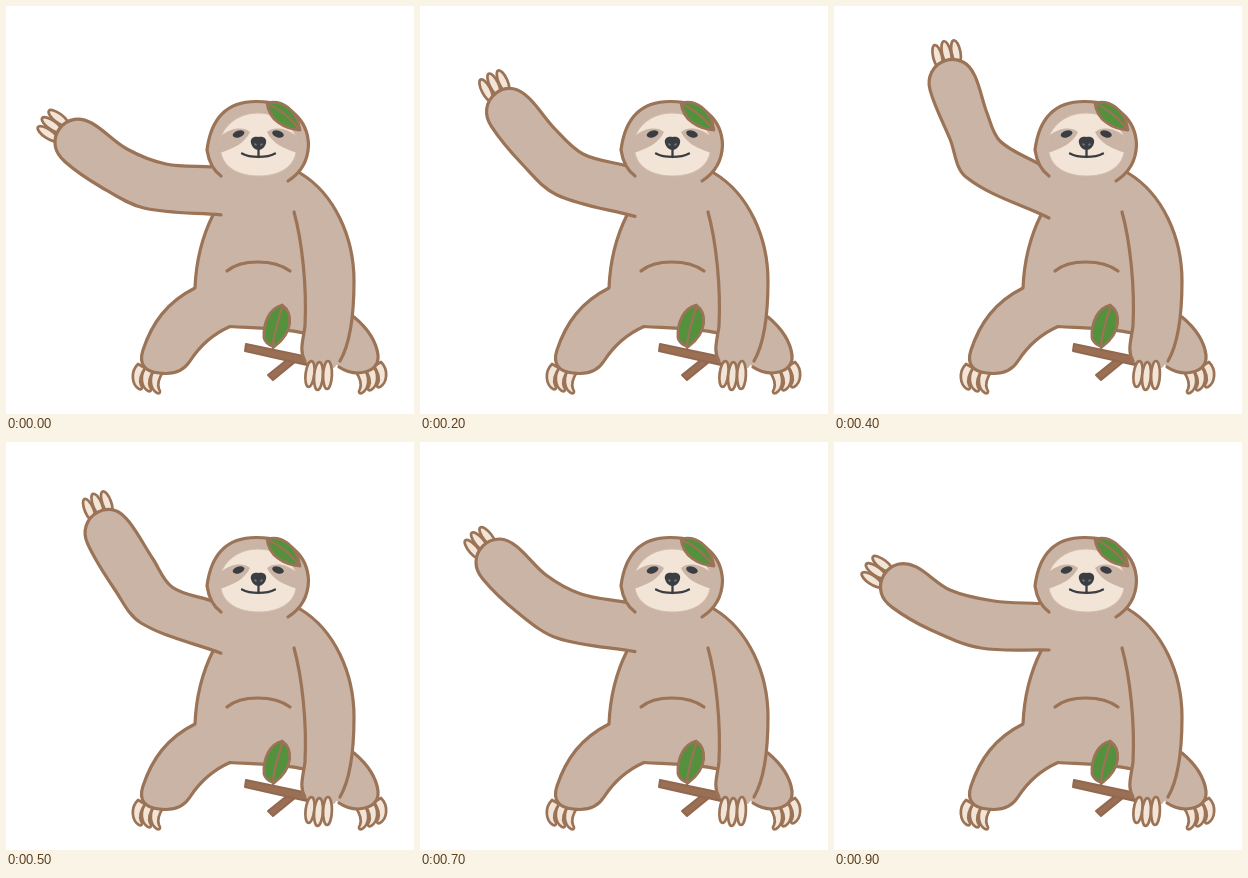
An HTML page with a canvas that plays this animation: 408 px wide and 408 px high, repeating every 1000 ms.

```html
<!DOCTYPE html>
<html lang="en">
<head>
<meta charset="utf-8">
<title>Waving sloth</title>
<style>
  html, body { margin: 0; width: 100%; height: 100%; overflow: hidden; background: #fff; }
  canvas { display: block; width: 100vw; height: 100vh; }
</style>
</head>
<body>
<canvas id="stage"></canvas>
<script>
const SIZE = 408, STEP = 100;
const FUR = '#c9b4a6', LINE = '#9b7356', CREAM = '#f2e4d7';
const GREEN = '#53913d', BARK = '#9b6f53', DARK = '#3a3d42';

const canvas = document.getElementById('stage');
const ctx = canvas.getContext('2d');
const dpr = window.devicePixelRatio || 1;
canvas.width = canvas.height = SIZE * dpr;

// Arm poses from lowest to highest; the wave runs up and back down.
// hand: x, y, axis in degrees; claws: x, y, tilt
const POSES = [
  { hand: [70, 145, -60], claws: [42, 129, -53], top: [[160, 159], [116, 148]], low: [[97, 188], [147, 206]] },
  { hand: [72.5, 136.5, -55], claws: [46, 119, -53], top: [[160, 158], [121, 143]], low: [[95, 181], [138, 202]] },
  { hand: [79.5, 120.5, -44], claws: [59.5, 100, -38], top: [[161, 152], [126, 133]], low: [[97, 170], [137, 196]] },
  { hand: [90, 106, -37], claws: [74, 78.5, -24], top: [[163, 148], [135, 123]], low: [[103, 159], [137, 189]] },
  { hand: [102.5, 91, -27], claws: [91.5, 63, -20], top: [[166, 145], [147, 117]], low: [[109, 148], [135, 181]] },
  { hand: [118.5, 77, -17], claws: [112.5, 47, -11], top: [[166, 135], [153, 107]], low: [[116, 133], [132, 171]] }
];
const ORDER = [1, 2, 3, 4, 5, 4, 3, 2, 1, 0];
const HAND_R = 23.5;

const rad = deg => deg * Math.PI / 180;

function shape(d, fill, stroke, width = 3.2) {
  const path = new Path2D(d);
  if (fill) {
    ctx.fillStyle = fill;
    ctx.fill(path);
  }
  if (stroke) {
    ctx.strokeStyle = stroke;
    ctx.lineWidth = width;
    ctx.stroke(path);
  }
}

function oval(x, y, rx, ry, tilt, fill, stroke, width = 2.7) {
  ctx.beginPath();
  ctx.ellipse(x, y, rx, ry, rad(tilt), 0, Math.PI * 2);
  ctx.fillStyle = fill;
  ctx.fill();
  if (stroke) {
    ctx.strokeStyle = stroke;
    ctx.lineWidth = width;
    ctx.stroke();
  }
}

const claw = (x, y, tilt, len = 12) => oval(x, y, 4.4, len, tilt, CREAM, LINE);

// Curved toe claw; side 1 hooks to the right, -1 to the left
function toe(x, y, side) {
  ctx.save();
  ctx.translate(x, y);
  ctx.scale(side, 1);
  shape('M-1 -3C-9 5 -7 18 0 22C3 23 4 21 2 18C0 13 2 7 6 1Z', CREAM, LINE, 2.7);
  ctx.restore();
}

// Smooth curve through points, handles scaled to each segment
function spline(pts) {
  const at = i => pts[Math.max(0, Math.min(pts.length - 1, i))];
  const handle = (i, len) => {
    const [a, b, p] = [at(i - 1), at(i + 1), at(i)];
    const k = len / Math.hypot(b[0] - a[0], b[1] - a[1]);
    return [p[0] + (b[0] - a[0]) * k, p[1] + (b[1] - a[1]) * k];
  };
  let d = `M${pts[0]}`;
  for (let i = 0; i < pts.length - 1; i++) {
    const [p, q] = [pts[i], pts[i + 1]];
    const len = Math.hypot(q[0] - p[0], q[1] - p[1]) / 3;
    d += `C${handle(i, len)} ${handle(i + 1, -len)} ${q}`;
  }
  return d;
}

function drawBody() {
  for (let i = 2; i >= 0; i--) {
    toe(133 + i * 9, 361 + i * 2, 1);
    toe(374 - i * 9, 359 + i * 3, -1);
  }

  const thigh = 'M348 311C360 321 370 334 372 349C373 361 364 366 352 367C345 367 339 365 333 361';
  shape(thigh + 'L318 345L320 320Z', FUR);
  shape(thigh, null, LINE);

  const side = 'M207 209C195 233 190 257 189 282C161 296 146 317 137 344C132 359 140 366 153 367C167 369 177 366 184 355C195 338 207 328 224 320.5C250 322 275 322 298 327';
  shape(side + 'L340 300L297 168L250 150L205 163Z', FUR);
  shape(side, null, LINE);
  shape('M221 265C235 253 268 253 284 265', null, LINE);
}

function drawRightArm() {
  shape('M258 332C257 316 264 302 276 299C287 307 288 326 268 341C262 339 259 336 258 332Z', GREEN, LINE, 2.8);
  shape('M276 302C272 316 267 328 267 342', null, LINE, 2.4);
  shape('M282 353L262 369L267 374L289 356Z', BARK, '#916850', 2);
  shape('M240 338L302 351L301 359L239 345Z', BARK, '#916850', 2);

  const outer = 'M294 167C329 188 348 232 348 275C348 308 345 336 334 355';
  const inner = 'M288 206C296 235 301 280 299 320C297 335 293 345 299 355';
  shape(outer + 'L328 362L299 356C293 345 297 335 299 320C301 280 296 235 288 206Z', FUR);
  shape(outer, null, LINE);
  shape(inner, null, LINE);
  claw(304, 368, 7, 13);
  claw(312.5, 370, 4, 14);
  claw(321.5, 369, 2, 14);
}

function drawWavingArm({ hand, claws, top, low }, level) {
  ctx.save();
  ctx.translate(claws[0], claws[1]);
  ctx.rotate(rad(claws[2]));
  claw(-9.5, 2, -3);
  claw(9.5, 1, 0);
  claw(0, 0, -2);
  ctx.restore();

  const [x, y, axis] = hand;
  const cap = [90, 45, 0, -45, -90].map(turn => {
    const a = rad(axis + turn);
    return [x + HAND_R * Math.sin(a), y - HAND_R * Math.cos(a)];
  });
  const edge = spline([[205, 161.5 - level * 0.7], ...top, ...cap, ...low, [215, 208 + level * 0.8]]);
  shape(edge + 'L245 190Z', FUR);
  shape(edge, null, LINE);
}

function drawHead() {
  const head = 'M215 170C208 165 203 157 201 144C205 112 221 95.500 250 95.500C283 95 302 114 302.500 139C302 156 293 168 282 175';
  shape(head, FUR, LINE);

  // Face, then the fur patches around the eyes
  shape('M216 128C223 114 237 107 252 107C267 107 282 114 289 128C291 134 291 141 290 147C287 162 272 170 253 170C233 170 218 162 215 147C214 141 214 134 216 128Z', CREAM, '#d3bba8', 1);
  const patch = 'M244 126C237 120 224 122 215 130L213 147C227 143 239 137 244 126Z';
  shape(patch, FUR);
  ctx.save();
  ctx.translate(505, 0);
  ctx.scale(-1, 1);
  shape(patch, FUR);
  ctx.restore();

  oval(232.5, 128, 6, 3.3, -18, DARK);
  oval(272, 128, 6, 3.3, 18, DARK);
  shape('M252.500 131C258 130 261 133 260 137C259 141 256 144 252.500 144C249 144 246 141 245 137C244 133 247 130 252.500 131Z', DARK);
  oval(249.5, 138.5, 1.4, 1, 30, '#777a7e');
  oval(255.5, 138.5, 1.4, 1, -30, '#777a7e');
  shape('M252.500 143V151M236 147.500C244 152 261 152 269 147.500', null, DARK, 2.3);

  shape('M261 97C275 93 291 103 294 124C278 123 263 114 261 97Z', GREEN, LINE, 2.8);
  shape('M262 98C274 103 285 113 293 123', null, LINE, 2.4);
}

function draw(now) {
  const level = ORDER[Math.floor(now / STEP) % ORDER.length];
  ctx.setTransform(dpr, 0, 0, dpr, 0, 0);
  ctx.lineCap = ctx.lineJoin = 'round';
  ctx.fillStyle = '#fff';
  ctx.fillRect(0, 0, SIZE, SIZE);
  drawBody();
  drawRightArm();
  drawWavingArm(POSES[level], level);
  drawHead();
}

const start = performance.now();
function loop() {
  draw(performance.now() - start);
  requestAnimationFrame(loop);
}
loop();
</script>
</body>
</html>
```
